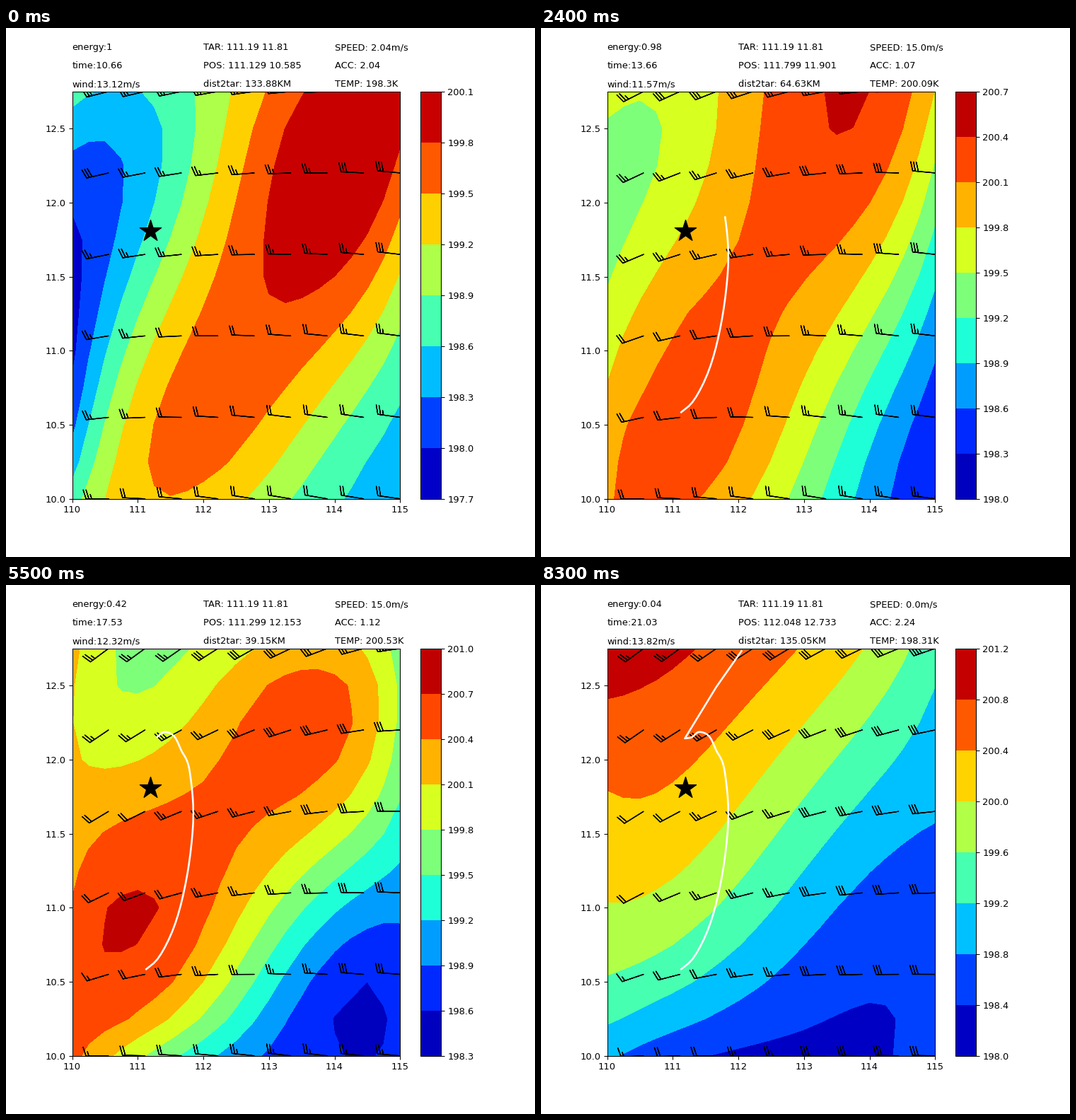
Write a matplotlib script that moves like this. It is 748 px wide and 748 px high and loops after 8.4 s.

```python
import numpy as np
import matplotlib.pyplot as plt
from matplotlib.animation import FuncAnimation

FRAMES, STEP_MS = 84, 100
TARGET = (111.19, 11.81)
LEFT, BOTTOM, HEIGHT, WIDTH = 0.125, 0.11, 0.77, 0.775

fig = plt.figure(figsize=(8, 8), dpi=93.5)

lon, lat = np.linspace(110, 115, 21), np.linspace(10, 12.75, 12)
barb_lon, barb_lat = np.linspace(110, 115, 10), np.linspace(10, 12.75, 6)

# Control heights of the temperature surface: hundredths of a degree
# above 198 K on a 4 x 4 lattice, south row first.
HEIGHTS = {
    0: [[75, 148, 90, 52], [-5, 153, 158, 74],
        [-5, 98, 195, 144], [72, 80, 170, 195]],
    18: [[193, 203, 120, 42], [112, 195, 170, 66],
         [90, 163, 204, 125], [152, 163, 226, 193]],
    32: [[225, 200, 110, 12], [255, 262, 165, 50],
         [200, 244, 241, 110], [175, 199, 260, 160]],
    47: [[270, 193, 78, 48], [262, 290, 168, 72],
         [218, 247, 278, 160], [180, 165, 255, 175]],
    63: [[228, 102, 72, 80], [227, 230, 139, 110],
         [215, 223, 217, 153], [258, 188, 190, 157]],
    83: [[88, 38, 30, 50], [192, 152, 80, 60],
         [242, 222, 152, 90], [313, 273, 225, 133]],
}

# frame, longitude, latitude
ROUTE = np.array([
    [0, 111.129, 10.5846], [3, 111.3, 10.652], [7, 111.526, 10.839],
    [13, 111.752, 11.216], [18, 111.845, 11.574], [24.3, 111.795, 11.913],
    [32, 111.6603, 12.0652], [40, 111.547, 12.161], [47, 111.4107, 12.1867],
    [56, 111.285, 12.15], [63, 111.185, 12.1429],
    [75, 111.664, 12.4898], [83, 112.0479, 12.7327],
])
SPENT = 63  # from here on it only drifts with the wind

KEYS = [0, 18, 32, 47, 63, 75, 83]
ENERGY = [1, 1, 0.96, 0.7, 0.15, 0.05, 0.04]
WIND = [13.12, 11.7, 11.4, 12.04, 12.61, 13.18, 13.82]
ACC = [2.04, 1.19, 0.92, 0.51, 1.74, 2.06, 2.24]
TEMP = [198.3, 199.81, 200.47, 200.74, 200.31, 198.87, 198.31]


def lagrange(count, t):
    """Weights of evenly spaced nodes on 0..1, one row per node."""
    nodes = np.linspace(0, 1, count)
    rows = []
    for i, a in enumerate(nodes):
        others = np.delete(nodes, i)
        rows.append(np.prod([(t - b) / (a - b) for b in others], axis=0))
    return np.array(rows)


def surface(heights):
    h = np.array(heights) / 100
    across = lagrange(4, np.linspace(0, 1, len(lon)))
    along = lagrange(4, np.linspace(0, 1, len(lat)))
    z = along.T @ h @ across
    return 198 + np.clip(z, h.min() - 0.06, h.max() + 0.06)


MAP_KEYS = np.array(list(HEIGHTS))
MAPS = [surface(h) for h in HEIGHTS.values()]


def temperature(n):
    i = min(np.searchsorted(MAP_KEYS, n, side="right"), len(MAPS) - 1)
    start, end = MAP_KEYS[i - 1], MAP_KEYS[i]
    s = (n - start) / (end - start)
    return (1 - s) * MAPS[i - 1] + s * MAPS[i]


def ease(t):
    t = np.clip(t, 0, 1)
    return t * t * (3 - 2 * t)


def wind(n):
    """Tilt from the west, centre and east meridians, turning over time."""
    t = n / (FRAMES - 1)
    calm = (1 - t) ** 3
    y = np.linspace(0, 1, len(barb_lat))

    def blend(south, north, shape):
        return south + (north - south) * shape

    tilt = np.array([
        blend(4, 37 - 22 * calm, 1 - (1 - y) ** 4),
        blend(-8 + 8 * t ** 3, 9 + 23 * ease(t / 0.75), y),
        blend(-8 + 7 * t * t, -4 + 23 * ease((t - 0.4) / 0.5), y ** 2),
    ])
    knots = np.array([
        blend(11.5 + 14 * calm, 23.5 + 9 * calm, y),
        blend(20 + 5 * t, 29, y ** 2),
        blend(21 + 9 * t, 33, y),
    ])
    across = lagrange(3, np.linspace(0, 1, len(barb_lon)))
    angle, speed = np.radians(tilt.T @ across), knots.T @ across
    return speed * np.cos(angle), speed * np.sin(angle)


def hermite(t, v, at):
    m = np.gradient(v, t)
    i = np.clip(np.searchsorted(t, at, side="right") - 1, 0, len(t) - 2)
    h = t[i + 1] - t[i]
    s = (at - t[i]) / h
    return ((1 + 2 * s) * (1 - s) ** 2 * v[i] + s * (1 - s) ** 2 * h * m[i]
            + s * s * (3 - 2 * s) * v[i + 1] + s * s * (s - 1) * h * m[i + 1])


def track(col):
    n = np.arange(FRAMES)
    flown = ROUTE[ROUTE[:, 0] <= SPENT]
    curve = hermite(flown[:, 0], flown[:, col], np.minimum(n, SPENT))
    line = np.interp(n, ROUTE[:, 0], ROUTE[:, col])
    return np.where(n <= SPENT, curve, line)


PX, PY = track(1), track(2)


def short(v, digits=2):
    return f"{round(float(v), digits):g}"


def reading(values, n):
    return short(np.interp(n, KEYS, values))


def labels(n):
    x, y = PX[n], PY[n]
    dist = np.hypot(104.9 * (x - TARGET[0]), 109.13 * (y - TARGET[1]))
    speed = min(15.0, round(2.04 * (n + 1), 2)) if n <= SPENT else 0.0
    return [
        [f"energy:{reading(ENERGY, n)}", f"time:{short(10.658 + n / 8)}",
         f"wind:{reading(WIND, n)}m/s"],
        [f"TAR: {TARGET[0]} {TARGET[1]}",
         f"POS: {short(x, 3)} {short(y, 3)}",
         f"dist2tar: {short(dist)}KM"],
        [f"SPEED: {speed}m/s", f"ACC: {reading(ACC, n)}",
         f"TEMP: {reading(TEMP, n)}K"],
    ]


def draw(n):
    fig.clear()
    ax = fig.add_axes([LEFT, BOTTOM, WIDTH * 0.8, HEIGHT])
    cax = fig.add_axes([LEFT + WIDTH * 0.85, BOTTOM, HEIGHT / 20, HEIGHT])

    fill = ax.contourf(lon, lat, temperature(n), cmap="jet")
    fig.colorbar(fill, cax=cax)
    ax.barbs(barb_lon, barb_lat, *wind(n))
    ax.scatter(*TARGET, s=600, marker="*", color="black", zorder=2)
    if n:
        ax.plot(PX[:n + 1], PY[:n + 1], color="white", lw=2)

    for col, lines in enumerate(labels(n)):
        for row, line in enumerate(lines):
            ax.text(110 + 2 * col, 13.03 - 0.125 * row, line)

    ax.set_xlim(110, 115)
    ax.set_ylim(10, 12.75)
    return []


anim = FuncAnimation(fig, draw, frames=FRAMES, interval=STEP_MS,
                     init_func=lambda: draw(0), repeat=True, repeat_delay=0)
plt.show()
```
